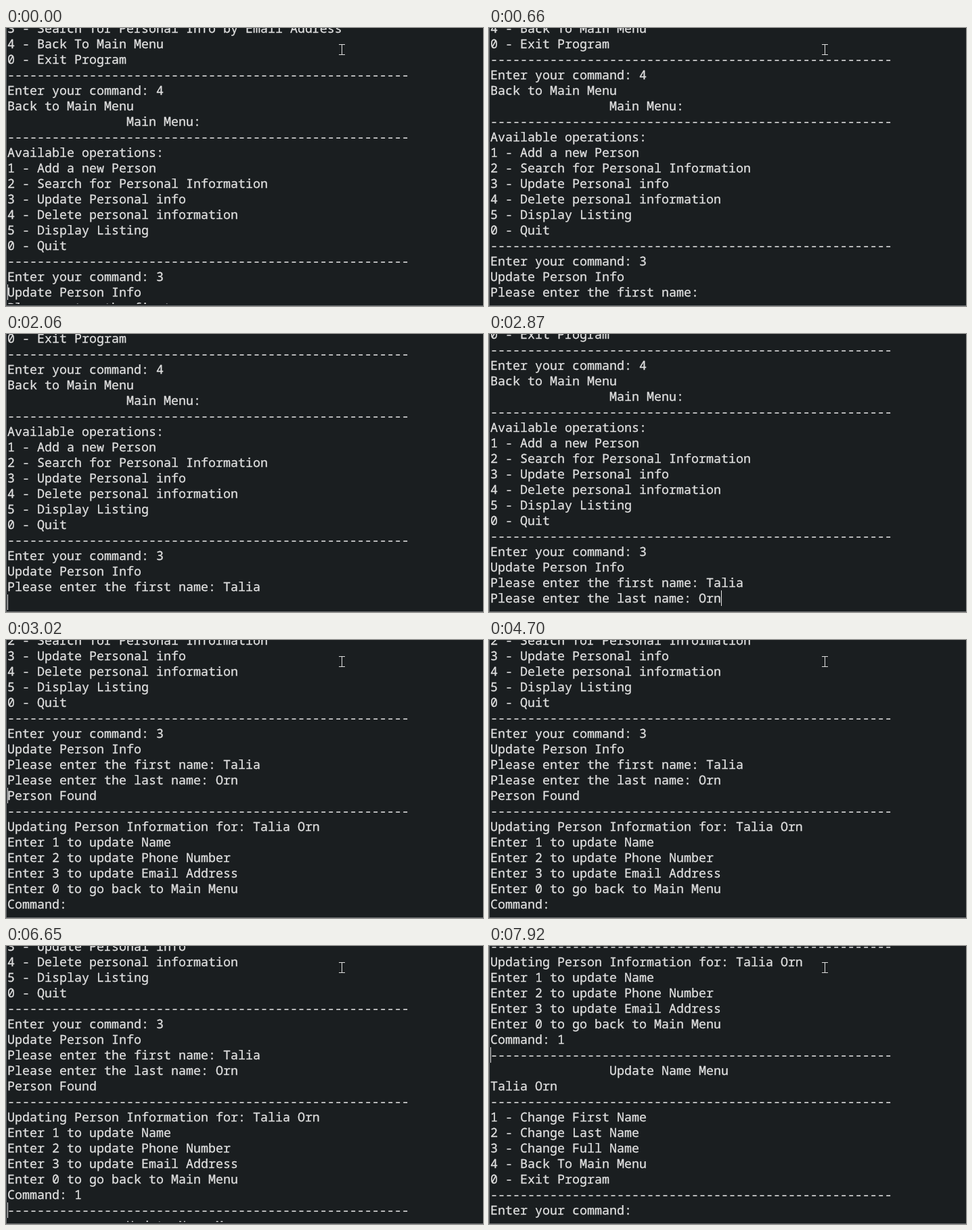
Animation, 705 px wide and 412 px high, one loop 8000 ms. Source, as an HTML page:

```html
<!DOCTYPE html>
<html lang="en">
<head>
<meta charset="utf-8">
<title>Terminal session</title>
<style>
  html, body { margin: 0; width: 100%; height: 100%; overflow: hidden; background: #1a1e20; }
  #stage { position: relative; width: 705px; height: 412px; overflow: hidden; }
  #view { position: absolute; inset: 0 0 3px 0; overflow: hidden; }
  #text {
    position: absolute; left: 2px; top: 0; margin: 0;
    font: 18.33px/23px "Noto Sans Mono", monospace;
    font-variant-ligatures: none;
    text-rendering: geometricPrecision;
    color: #e0e0e0;
    -webkit-text-stroke: .3px #e0e0e0;
  }
  #caret { position: absolute; width: 1px; height: 23px; background: #e8e8e8; }
  #mouse { position: absolute; left: 491px; top: 24px; }
  .edge { position: absolute; left: 0; bottom: 0; background: #6a6d6f; }
</style>
</head>
<body>
<div id="stage">
  <div id="view">
    <pre id="text"></pre>
    <div id="caret"></div>
    <svg id="mouse" width="10" height="16" fill="none" stroke="#e0e0e0">
      <path d="M1 .5H10M5.5 1V15M1 15.5H10"/>
    </svg>
  </div>
  <div class="edge" style="width:1px;height:412px"></div>
  <div class="edge" style="width:705px;height:1px"></div>
</div>
<script>
const LOOP = 8000, ROW = 23, COL = 11;
const FIRST = "Talia", LAST = "Orn";
const RULE = "-".repeat(54), INDENT = " ".repeat(16);
const $ = id => document.getElementById(id);
const text = $("text"), caret = $("caret"), mouse = $("mouse");

const session = s => [
  "3 - Search for Personal Info by Email Address",
  "4 - Back To Main Menu",
  "0 - Exit Program",
  RULE,
  "Enter your command: 4",
  "Back to Main Menu",
  INDENT + "Main Menu:",
  RULE,
  "Available operations:",
  "1 - Add a new Person",
  "2 - Search for Personal Information",
  "3 - Update Personal info",
  "4 - Delete personal information",
  "5 - Display Listing",
  "0 - Quit",
  RULE,
  "Enter your command: 3",
  "Update Person Info",
  "Please enter the first name: " + FIRST.slice(0, s.first),
  "Please enter the last name: " + LAST.slice(0, s.last),
  "Person Found",
  RULE,
  `Updating Person Information for: ${FIRST} ${LAST}`,
  "Enter 1 to update Name",
  "Enter 2 to update Phone Number",
  "Enter 3 to update Email Address",
  "Enter 0 to go back to Main Menu",
  "Command: " + s.cmd,
  RULE,
  INDENT + "Update Name Menu",
  `${FIRST} ${LAST}`,
  RULE,
  "1 - Change First Name",
  "2 - Change Last Name",
  "3 - Change Full Name",
  "4 - Back To Main Menu",
  "0 - Exit Program",
  RULE,
  "Enter your command: "
];

// Each step overrides part of the state: y = scroll, rows = printed lines,
// line = caret row, end = caret after the typed text, on = caret lit.
const steps = [
  [0, { y: -11, rows: 19, line: 17, end: false, on: true, mouse: true, first: 0, last: 0, cmd: "" }],
  [120, { y: -34 }],
  [660, { on: false }],
  [1080, { on: true }],
  [1230, { first: 1, line: 18, end: true, mouse: false }],
  [1480, { first: 2 }],
  [1630, { first: 4 }],
  [1750, { first: 5 }],
  [2060, { y: -51, line: 19, end: false }],
  [2180, { y: -57, rows: 20, mouse: true }],
  [2580, { last: 1, end: true, mouse: false }],
  [2730, { last: 2 }],
  [2870, { last: 3 }],
  [3020, { y: -241, rows: 28, line: 20, end: false, mouse: true }],
  [3580, { on: false }],
  [4170, { on: true }],
  [4700, { on: false }],
  [5010, { cmd: "1", line: 27, end: true, on: true }],
  [5130, { mouse: false }],
  [5560, { on: false }],
  [6120, { on: true }],
  [6650, { y: -264, rows: 39, line: 28, end: false, mouse: true }],
  [6800, { y: -494 }],
  [7390, { on: false }],
  [7920, { on: true }]
];

const show = (el, on) => { el.style.visibility = on ? "visible" : "hidden"; };

function render(index) {
  const s = Object.assign({}, ...steps.slice(0, index + 1).map(step => step[1]));
  const lines = session(s).slice(0, s.rows);
  const col = s.end ? lines[s.line].length : 0;
  text.textContent = lines.join("\n");
  text.style.transform = `translateY(${s.y}px)`;
  caret.style.left = 2 + col * COL + "px";
  caret.style.top = s.y + s.line * ROW + "px";
  show(caret, s.on);
  show(mouse, s.mouse);
}

let current = -1;
const start = performance.now();

function tick() {
  const t = (performance.now() - start) % LOOP;
  const index = steps.filter(step => step[0] <= t).length - 1;
  if (index !== current) render(current = index);
  requestAnimationFrame(tick);
}
tick();
</script>
</body>
</html>
```
